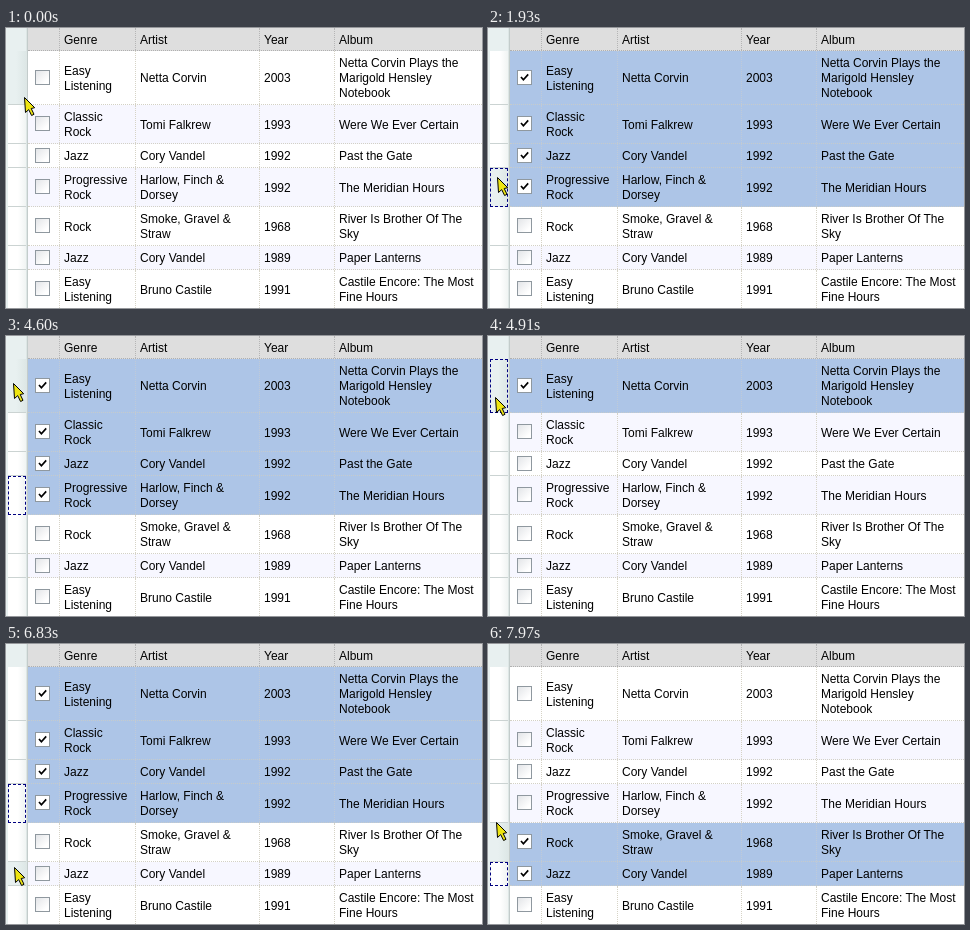
An HTML page that plays this animation: 476x280 px, repeating every 8000 ms.

```html
<!DOCTYPE html>
<html lang="en">
<head>
<meta charset="utf-8">
<title>Row selection by dragging</title>
<style>
html, body { margin: 0; width: 100%; height: 100%; overflow: hidden; background: #fff; }
#stage {
  position: relative; width: 476px; height: 280px; overflow: hidden; background: #e8f0f0;
  font: 12px/15px "Liberation Sans", Arial, sans-serif; color: #000; cursor: default;
}
#stage div, #stage svg { position: absolute; box-sizing: border-box; }
.head { left: 22px; top: 0; width: 454px; height: 23px; background: #dedede; border-bottom: 1px dotted #b0b0b0; }
.cell {
  top: 0; height: 100%; display: flex; align-items: center; padding: 2px 0 0 4px;
  white-space: pre; border-right: 1px dotted #d6d3c6;
}
.head .cell { border-right-color: #b5b5b5; }
.cell:last-child { border-right: 0; }
.row { left: 22px; width: 454px; background: #fff; border-bottom: 1px dotted #d3d1c6; }
.row.alt { background: #f7f7ff; }
.row.on { background: #adc5e7; border-bottom-color: #c6cbcb; }
.row.on .cell { border-right-color: #bfcad8; }
.box {
  left: 7px; width: 15px; height: 15px; border: 1px solid #8f989f;
  background: linear-gradient(135deg, #e3e5e8, #fff 80%);
}
.on .box { background: #fff; }
.box svg { left: 0; top: 0; display: none; }
.on .box svg { display: block; }
.grip { left: 2px; width: 18px; background: linear-gradient(90deg, #fff 55%, #f0f4f3); border-bottom: 1px solid #cbd3d2; }
.grip.hover { background: linear-gradient(90deg, #e8f0f0 45%, #dde7e6); }
.grip.focus { border: 1px dashed #000080; }
.edge { left: 20px; top: 0; width: 2px; height: 280px; background: linear-gradient(90deg, #dde6e5 50%, #c3cccb 50%); }
#arrow { left: 0; top: 0; overflow: visible; }
</style>
</head>
<body>
<div id="stage"></div>
<script>
const LOOP = 8000, STEP = 60;
const stage = document.getElementById('stage');

// left, width, heading
const cols = [[0, 32, ''], [32, 76, 'Genre'], [108, 124, 'Artist'], [232, 75, 'Year'], [307, 147, 'Album']];

const records = [
  ['Easy\nListening', 'Netta Corvin', '2003', 'Netta Corvin Plays the\nMarigold Hensley\nNotebook'],
  ['Classic\nRock', 'Tomi Falkrew', '1993', 'Were We Ever Certain'],
  ['Jazz', 'Cory Vandel', '1992', 'Past the Gate'],
  ['Progressive\nRock', 'Harlow, Finch &\nDorsey', '1992', 'The Meridian Hours'],
  ['Rock', 'Smoke, Gravel &\nStraw', '1968', 'River Is Brother Of The\nSky'],
  ['Jazz', 'Cory Vandel', '1989', 'Paper Lanterns'],
  ['Easy\nListening', 'Bruno Castile', '1991', 'Castile Encore: The Most\nFine Hours']
];

// pointer moves: start, end, target x and y, sideways bow
const home = [18, 69];
const moves = [
  [460, 1660, 9, 149, -4.5],
  [2000, 2600, 8, 232, 5],
  [3760, 4600, 7, 47, 0],
  [4730, 5510, 7, 149, 0],
  [5910, 6630, 8, 223, 3],
  [7490, 7970, 8, 178, 0]
];

// press, release, first row
const drags = [[330, 1930, 0], [4730, 5840, 0], [7290, LOOP, 5]];

function add(parent, cls, style, text = '') {
  const el = document.createElement('div');
  el.className = cls;
  for (const k in style) el.style[k] = style[k] + 'px';
  el.textContent = text;
  return parent.appendChild(el);
}

function addCells(parent, texts) {
  return cols.map(([left, width], i) => add(parent, 'cell', { left, width }, texts[i]));
}

const tick = '<svg width="13" height="13"><path d="M3 6 5.4 8.8 10.2 3.4" fill="none" stroke="#000" stroke-width="1.7"/></svg>';

let bottom = 23;
const rows = records.map((texts, i) => {
  const top = bottom;
  const height = 9 + 15 * Math.max(...texts.map(s => s.split('\n').length));
  bottom += height;
  const line = add(stage, i % 2 ? 'row alt' : 'row', { top, height });
  const cells = addCells(line, ['', ...texts]);
  add(cells[0], 'box', { top: Math.floor((height - 16) / 2) }).innerHTML = tick;
  return { line, grip: add(stage, 'grip', { top, height }), bottom };
});

addCells(add(stage, 'head', {}), cols.map(c => c[2]));
add(stage, 'edge', {});
stage.insertAdjacentHTML('beforeend',
  '<svg id="arrow" width="13" height="20"><path d="M.5 .5 1.5 15.5 4.7 12.6 7.6 18.5 10 17.3 7.2 11.5 10.7 10.7Z" ' +
  'fill="#eee512" stroke="#000" stroke-linejoin="round"/></svg>');
const arrow = document.getElementById('arrow');

const ease = k => k * k * (3 - 2 * k);

function tipAt(t) {
  let [x, y] = home;
  for (const [start, end, toX, toY, bow] of moves) {
    if (t < start) break;
    const past = Math.floor((t - start) / STEP) * STEP;
    const k = ease(Math.min(1, past / (end - start)));
    x += (toX - x) * k + bow * Math.sin(Math.PI * k);
    y += (toY - y) * k;
  }
  return [Math.round(x), Math.round(y)];
}

const rowAt = t => rows.findIndex(r => tipAt(t)[1] + 1 < r.bottom);

function draw(t) {
  const over = rowAt(t);
  let first = -1, last = -1, focus = -1;
  for (const [press, release, anchor] of drags) {
    if (t < press) break;
    const end = rowAt(Math.min(t, release));
    first = Math.min(anchor, end);
    last = Math.max(anchor, end);
    focus = t < release ? anchor : end;
  }
  rows.forEach(({ line, grip }, i) => {
    line.classList.toggle('on', last >= 0 && i >= first && i <= last);
    grip.classList.toggle('hover', i === over);
    grip.classList.toggle('focus', i === focus);
  });
  const [x, y] = tipAt(t);
  arrow.style.transform = `translate(${x}px, ${y}px)`;
}

function loop() {
  draw(performance.now() % LOOP);
  requestAnimationFrame(loop);
}
loop();
</script>
</body>
</html>
```
